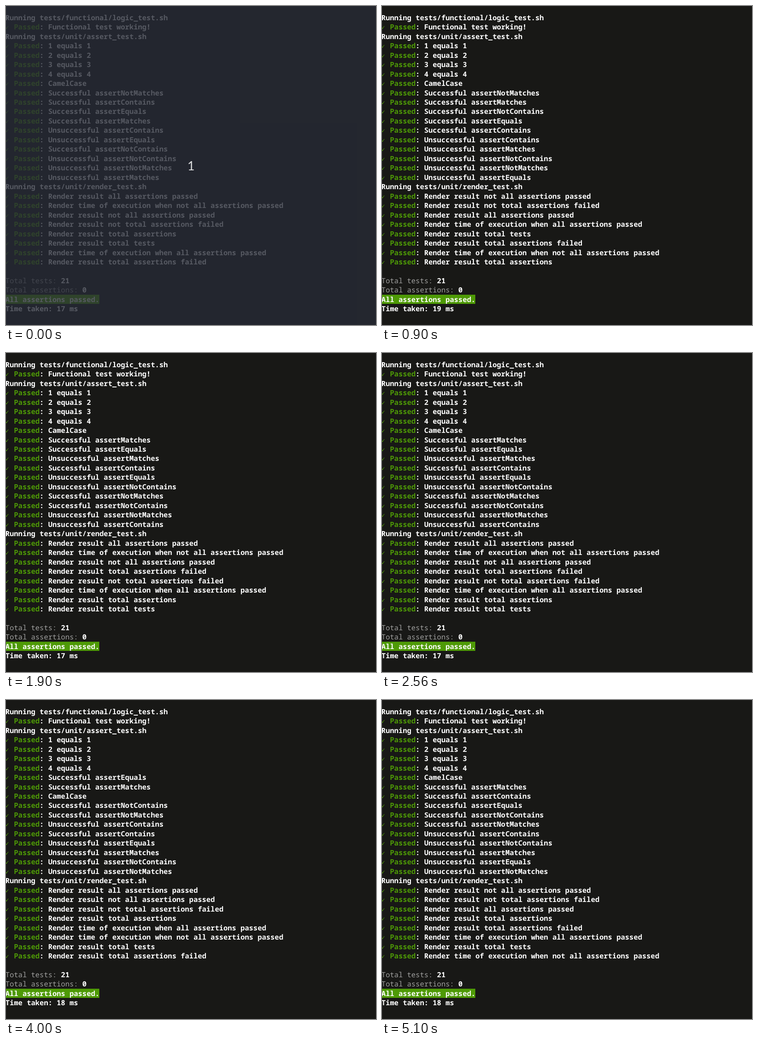
These frames come from a looping animation (805 px wide and 695 px high, 5600 ms). An HTML page:

```html
<!DOCTYPE html>
<html lang="en">
<head>
<meta charset="utf-8">
<title>Test run</title>
<style>
  html, body { margin: 0; width: 100%; height: 100%; overflow: hidden; background: #181816; }
  #stage { position: relative; width: 805px; height: 695px; overflow: hidden; }
  #screen {
    position: absolute; left: -1.3px; top: 14.8px;
    color: #fff; white-space: pre;
    font: 600 15.5px/20.47px "Noto Sans Mono", monospace;
    font-variant-ligatures: none;
    text-rendering: geometricPrecision;
  }
  #screen div { height: 20.47px; }
  .ok { color: #4e9a06; }
  .tick {
    display: inline-block; width: 1ch; height: 20.47px; vertical-align: top;
  }
  .tick i { font: 400 13px/20.47px "DejaVu Sans Mono", monospace; }
  .dim { color: #a0a09f; font-weight: 400; }
  .strong { font-weight: 700; }
  .banner { display: inline-block; height: 20.47px; vertical-align: top; background: #4e9a06; }
  #countdown {
    position: absolute; inset: 0; background: rgba(39, 43, 54, .78);
    color: #dedfe0; text-align: center;
    font: 400 27px/695px Lato, sans-serif;
  }
</style>
</head>
<body>
<div id="stage">
  <div id="screen"></div>
  <div id="countdown">1</div>
</div>
<script>
const LOOP = 5600;
const COUNTDOWN_END = 100;

const renderTests = {
  all: "result all assertions passed",
  notAll: "result not all assertions passed",
  failed: "result total assertions failed",
  notFailed: "result not total assertions failed",
  assertions: "result total assertions",
  tests: "result total tests",
  timeAll: "time of execution when all assertions passed",
  timeNotAll: "time of execution when not all assertions passed"
};

// "+" marks a successful assertion test, "-" an unsuccessful one.
const runs = [
  { start: 0, ms: 17,
    asserts: "CamelCase +NotMatches +Contains +Equals +Matches -Contains -Equals +NotContains -NotContains -NotMatches -Matches",
    renders: "all timeNotAll notAll notFailed assertions tests timeAll failed" },
  { start: 900, ms: 19,
    asserts: "CamelCase +NotMatches +Matches +NotContains +Equals +Contains -Contains -Matches -NotContains -NotMatches -Equals",
    renders: "notAll notFailed all timeAll tests failed timeNotAll assertions" },
  { start: 1900, ms: 17,
    asserts: "CamelCase +Matches +Equals -Matches +Contains -Equals -NotContains +NotMatches +NotContains -NotMatches -Contains",
    renders: "all timeNotAll notAll failed notFailed timeAll assertions tests" },
  { start: 3000, ms: 18,
    asserts: "+Contains CamelCase +Matches +Equals -Equals +NotContains +NotMatches -Matches -Contains -NotMatches -NotContains",
    renders: "all notFailed notAll assertions failed tests timeAll timeNotAll" },
  { start: 4000, ms: 18,
    asserts: "+Equals +Matches CamelCase +NotContains +NotMatches -Contains +Contains -Equals -Matches -NotContains -NotMatches",
    renders: "all notAll notFailed assertions timeAll timeNotAll tests failed" },
  { start: 5100, ms: 18,
    asserts: "CamelCase +Matches +Contains +Equals +NotContains +NotMatches -Contains -NotContains -Matches -Equals -NotMatches",
    renders: "notAll notFailed all assertions failed timeAll tests timeNotAll" }
];

const span = (cls, text) => `<span class="${cls}">${text}</span>`;
const heading = path => `Running tests/${path}_test.sh`;
const passed = name => span("ok", `${span("tick", "<i>✓</i>")} Passed`) + `: ${name}`;
const total = (label, value) => span("dim", `Total ${label}: `) + span("strong", value);
const assertName = code => code
  .replace("+", "Successful assert")
  .replace("-", "Unsuccessful assert");

function output({ asserts, renders, ms }) {
  return [
    heading("functional/logic"),
    passed("Functional test working!"),
    heading("unit/assert"),
    ...[1, 2, 3, 4].map(n => passed(`${n} equals ${n}`)),
    ...asserts.split(" ").map(code => passed(assertName(code))),
    heading("unit/render"),
    ...renders.split(" ").map(key => passed("Render " + renderTests[key])),
    "",
    total("tests", 21),
    total("assertions", 0),
    span("banner", "All assertions passed."),
    span("strong", `Time taken: ${ms} ms`)
  ].map(line => `<div>${line}</div>`).join("");
}

const screenEl = document.getElementById("screen");
const countdownEl = document.getElementById("countdown");
const pages = runs.map(output);
const origin = performance.now();
let shown = -1;

function draw() {
  const t = Math.max(0, performance.now() - origin) % LOOP;
  const index = runs.filter(run => run.start <= t).length - 1;
  if (index !== shown) {
    screenEl.innerHTML = pages[index];
    shown = index;
  }
  countdownEl.hidden = t >= COUNTDOWN_END;
  requestAnimationFrame(draw);
}
draw();
</script>
</body>
</html>
```
